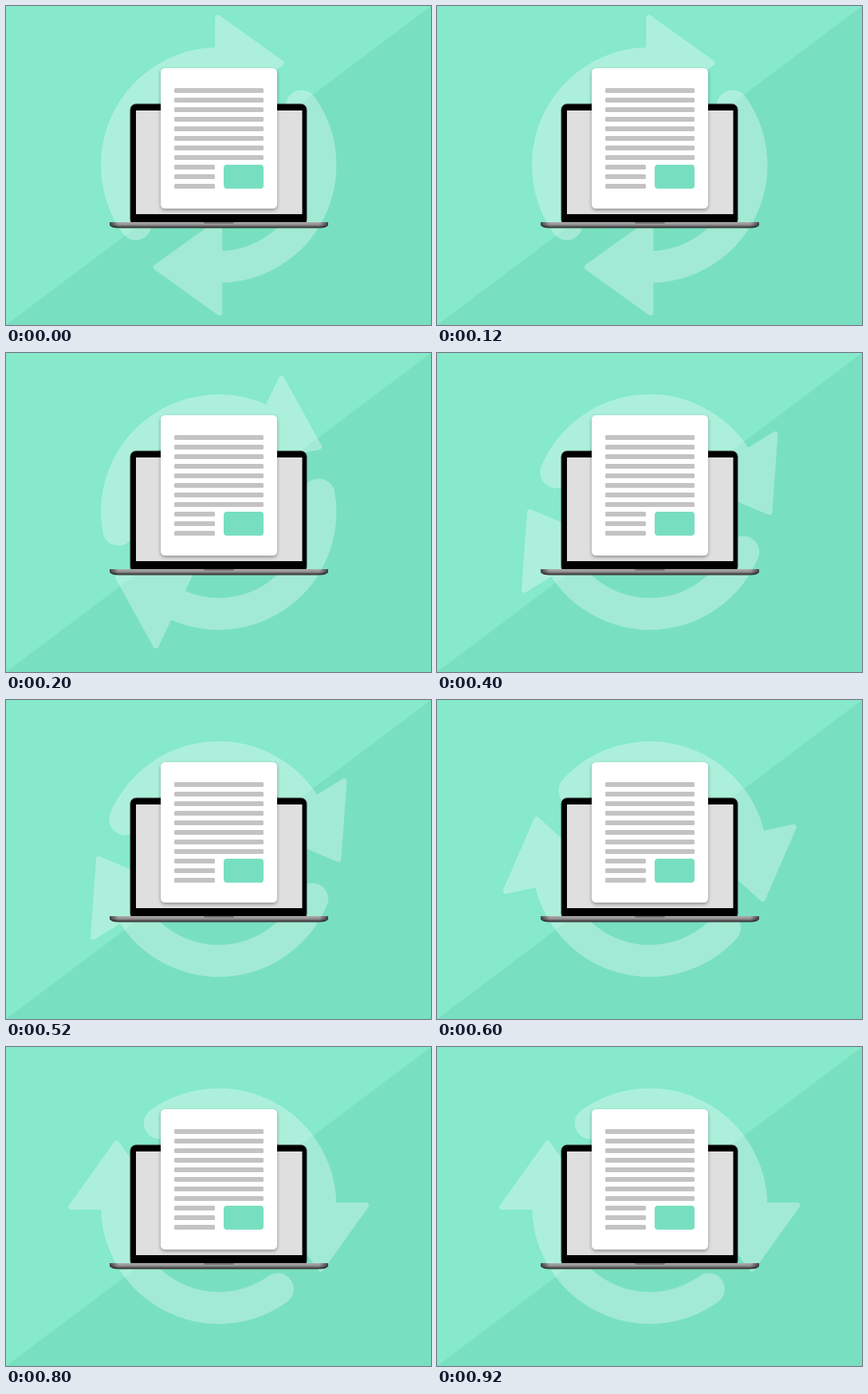
Animation, 533 px wide and 400 px high, one loop 1 s. Source, as an HTML page:

```html
<!DOCTYPE html>
<html lang="en">
<head>
<meta charset="utf-8">
<title>Document sync</title>
<style>
  html, body { margin: 0; width: 100%; height: 100%; overflow: hidden; background: #78e0c0; }
  svg { display: block; width: 100%; height: 100%; }
  .page { filter: drop-shadow(0 2px 2px rgba(0, 0, 0, .35)); }
</style>
</head>
<body>
<svg viewBox="0 0 533 400">
  <defs>
    <linearGradient id="metal" x2="0" y2="1">
      <stop offset="0" stop-color="#b0aeae"/>
      <stop offset=".5" stop-color="#8b8989"/>
      <stop offset=".7" stop-color="#5c5a5a"/>
      <stop offset="1" stop-color="#2b2929"/>
    </linearGradient>
    <linearGradient id="ends">
      <stop offset="0" stop-opacity=".6"/>
      <stop offset=".04" stop-opacity="0"/>
      <stop offset=".96" stop-opacity="0"/>
      <stop offset="1" stop-opacity=".6"/>
    </linearGradient>
    <g id="arrow">
      <path d="M-104 74A127.6 127.6 0 0 1 0-127.6" fill="none" stroke-width="40" stroke-linecap="round"/>
      <path d="M-1-185L78.5-128L-1-71Z" stroke-width="7" stroke-linejoin="round"/>
    </g>
    <path id="base" d="M130 271H404V275Q401 278.5 392 278.5H142Q133 278.5 130 275Z"/>
  </defs>

  <path d="M0 0H533L0 400Z" fill="#85e9ca"/>

  <g id="arrows" fill="#fff" stroke="#fff" opacity=".32">
    <use href="#arrow"/>
    <use href="#arrow" transform="rotate(180)"/>
  </g>

  <rect x="156" y="123" width="221" height="152" rx="7" stroke="#333" stroke-width="1"/>
  <rect x="163" y="131" width="208.5" height="130" fill="#dfdfdf"/>
  <use href="#base" fill="url(#metal)"/>
  <use href="#base" fill="url(#ends)"/>
  <path d="M248 271H286Q286 273 283 273H251Q248 273 248 271Z" fill="#777"/>

  <rect class="page" x="194" y="78" width="146" height="176" rx="5.5" fill="#fff"/>
  <g id="lines" fill="#c3c3c3"></g>
  <rect x="273" y="199" width="50" height="30" rx="4" fill="#77dfc0"/>
</svg>
<script>
  const byId = id => document.getElementById(id);
  const STEP = 200;
  const angles = [0, 25.5, 58.5, 77.8, 90];

  byId('lines').innerHTML = Array.from({ length: 11 }, (_, i) =>
    `<rect x="211" y="${103 + 12 * i}" width="${i < 8 ? 112 : 51}" height="6" rx="1.5"/>`).join('');

  function draw() {
    const step = Math.floor(performance.now() / STEP) % angles.length;
    byId('arrows').setAttribute('transform', `translate(266.7 199.5) rotate(${angles[step]})`);
    requestAnimationFrame(draw);
  }
  draw();
</script>
</body>
</html>
```
